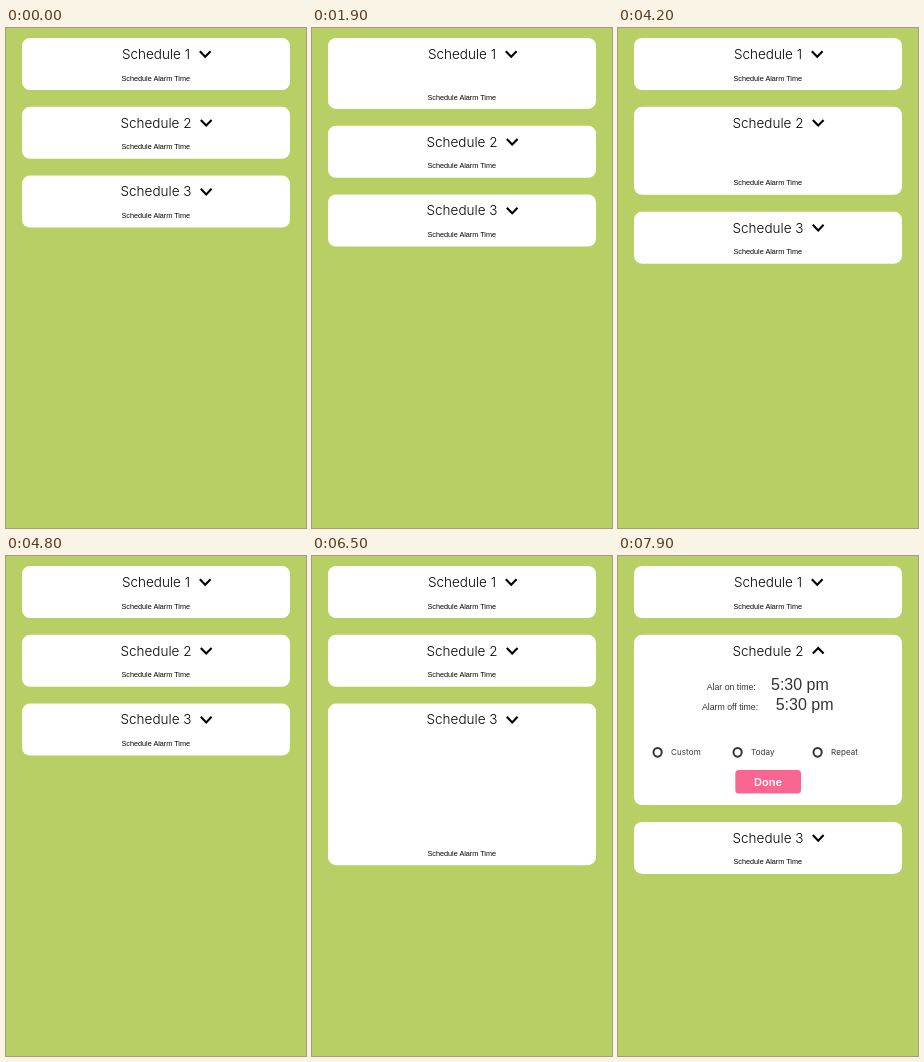
An HTML page for the animation above (8000 ms loop, 300 by 500 pixels).

```html
<!DOCTYPE html>
<html lang="en">
<head>
<meta charset="utf-8">
<title>Schedules</title>
<style>
  html, body { margin: 0; width: 100%; height: 100%; overflow: hidden; background: #b8cf66; }
  svg { display: block; width: 300px; height: 500px; }
  .card { fill: #fff; }
  .title { font: 300 13.5px Inter, sans-serif; text-anchor: middle; }
  .chevron { fill: none; stroke: #000; stroke-width: 2.1; }
  .sub { font: 7.25px "Liberation Sans", Arial, sans-serif; text-anchor: middle; }
  .label { font: 8.75px "Liberation Sans", Arial, sans-serif; }
  .time { font: 16px "Liberation Sans", Arial, sans-serif; }
  .option { font: 8px Inter, sans-serif; letter-spacing: .1px; }
  .ring { fill: none; stroke: #000; stroke-width: 2; }
  .button { fill: #f84177; }
  .done { font: 600 11px Inter, sans-serif; fill: #fff; text-anchor: middle; }
</style>
</head>
<body>
<svg id="stage" viewBox="0 0 300 500"></svg>
<script>
const LOOP = 8000, TICK = 100, SLIDE = 300, FADE = 700;
const TOP = 10, GAP = 16.8, CLOSED = 52, OPEN = 170.3;
const DOWN = '-5.4,-2.8 0,2.8 5.4,-2.8', UP = '-5.4,2.8 0,-2.8 5.4,2.8';

// Per card: [open, close] times in ms
const TOGGLES = [
  [[580, 1676]],
  [[2779, 4010], [7402, Infinity]],
  [[5197, 6450]]
];

const add = (parent, tag, attrs, text = '') => {
  const el = document.createElementNS('http://www.w3.org/2000/svg', tag);
  for (const key in attrs) el.setAttribute(key, attrs[key]);
  el.textContent = text;
  return parent.appendChild(el);
};
const write = (parent, cls, x, y, text) => add(parent, 'text', { class: cls, x, y }, text);
const shift = (el, x, y) => el.setAttribute('transform', `translate(${x} ${y})`);
const ease = (ms, length) => {
  const p = Math.min(1, Math.max(0, ms / length));
  return p * p * (3 - 2 * p);
};

function makeCard(i) {
  const root = add(stage, 'g');
  const box = add(root, 'rect', { class: 'card', x: 16, width: 268, rx: 8 });
  write(root, 'title', 150, 20.9, `Schedule ${i + 1}`);
  const chevron = add(root, 'polyline', { class: 'chevron' });
  shift(chevron, i ? 200.2 : 199.2, 16);
  const sub = write(root, 'sub', 149.8, 0, 'Schedule Alarm Time');

  const body = add(root, 'g');
  const times = add(body, 'g');
  write(times, 'label', 88.7, 55.2, 'Alar on time:');
  write(times, 'time', 153, 55.2, '5:30 pm');
  write(times, 'label', 83.9, 75, 'Alarm off time:');
  write(times, 'time', 157.7, 75, '5:30 pm');
  const options = add(body, 'g');
  ['Custom', 'Today', 'Repeat'].forEach((name, n) => {
    add(options, 'ellipse', { class: 'ring', cx: 39.6 + 80 * n, cy: 117.5, rx: 4.1, ry: 4.4 });
    write(options, 'option', 53 + 80 * n, 120.5, name);
  });
  const button = add(body, 'rect', { class: 'button', x: 117.3, width: 65.7, rx: 3.5 });
  const done = write(body, 'done', 150, 151, 'Done');

  return { root, box, chevron, sub, body, times, options, button, done };
}

function stateAt(toggles, t) {
  const span = toggles.filter(([from]) => t >= from).pop();
  if (!span) return { open: false, grow: 0, alpha: 0 };
  const [from, to] = span;
  const open = t < to;
  return {
    open,
    grow: open ? ease(t - from, SLIDE) : 1 - ease(t - to, SLIDE),
    alpha: open ? ease(t - from, FADE) : 0
  };
}

function draw(t) {
  let y = TOP;
  cards.forEach((c, i) => {
    const { open, grow, alpha } = stateAt(TOGGLES[i], t);
    const height = CLOSED + (OPEN - CLOSED) * grow;
    const rest = height - OPEN;
    shift(c.root, 0, y);
    c.box.setAttribute('height', height);
    c.chevron.setAttribute('points', open ? UP : DOWN);
    c.sub.setAttribute('y', height - 9.4);
    c.sub.setAttribute('visibility', open ? 'hidden' : 'visible');
    c.body.setAttribute('opacity', alpha);
    // Inner rows spread apart as the card grows
    shift(c.times, 0, rest * .23);
    shift(c.options, 0, rest * .8);
    c.button.setAttribute('y', 135.2 + rest * .8);
    c.button.setAttribute('height', Math.max(0, 23.4 + rest * .2));
    shift(c.done, 0, rest * .9);
    y += height + GAP;
  });
}

const stage = document.getElementById('stage');
const cards = TOGGLES.map((_, i) => makeCard(i));
const start = performance.now();

function frame() {
  const t = (performance.now() - start) % LOOP;
  draw(Math.floor(t / TICK) * TICK);
  requestAnimationFrame(frame);
}
frame();
</script>
</body>
</html>
```
